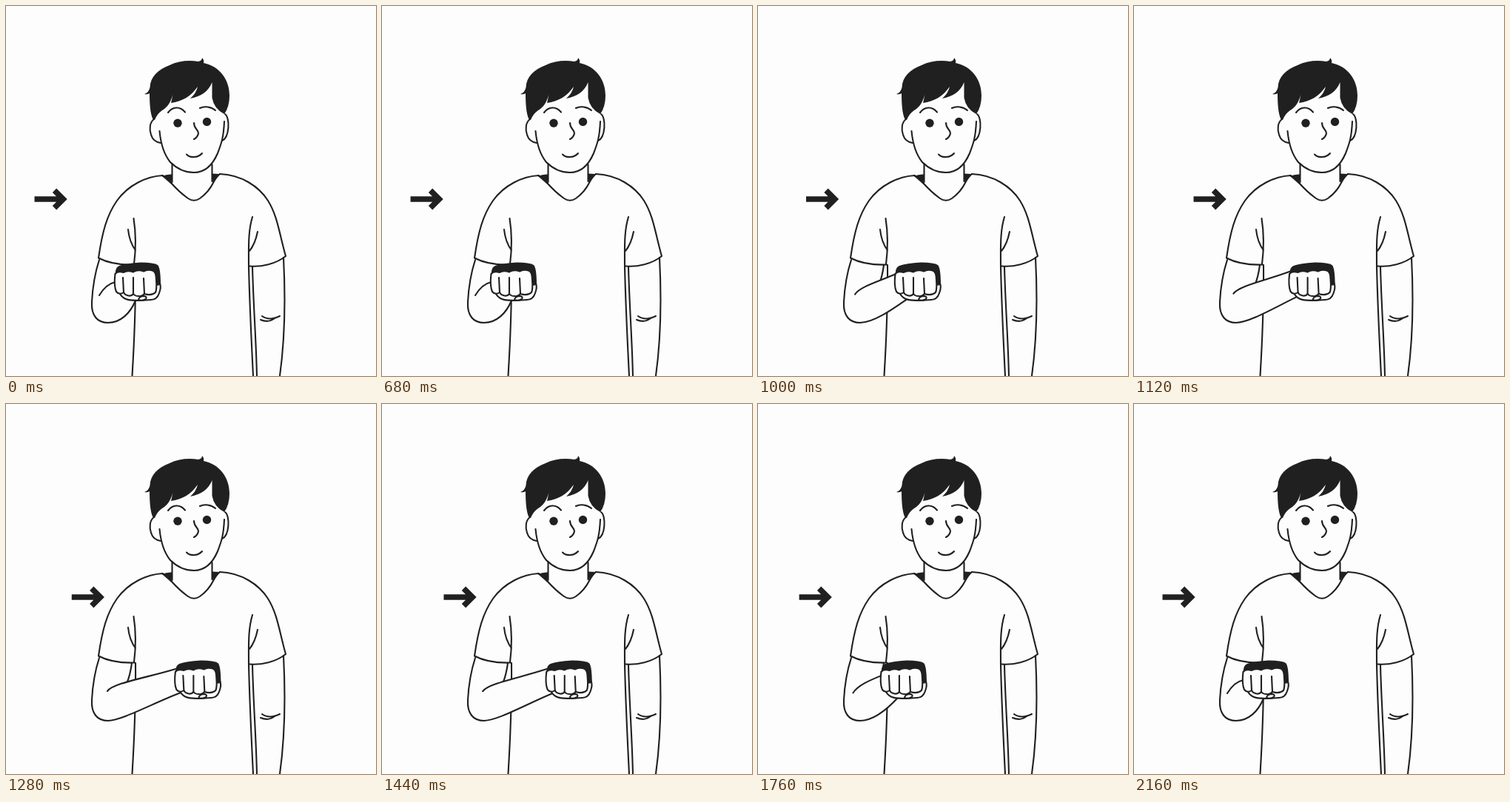
An HTML page for the animation above (3 s loop, 500 by 500 pixels).

```html
<!DOCTYPE html>
<html lang="en">
<head>
<meta charset="utf-8">
<title>Fist moving sideways</title>
<style>
  html, body { margin: 0; width: 100%; height: 100%; overflow: hidden; background: #fdfdfd; }
  svg { display: block; width: 100%; height: 100%; }
  .line { fill: none; stroke: #202020; stroke-width: 2.1; stroke-linecap: round; stroke-linejoin: round; }
  .ink { fill: #202020; }
  .paper { fill: #fdfdfd; }
  .solid { fill: #fdfdfd; }
  .arrow { fill: none; stroke: #202020; stroke-width: 7.6; }
</style>
</head>
<body>
<svg viewBox="0 0 500 500">
  <!-- head -->
  <g class="line">
    <path d="M200 153C194 157 193.500 167 196 174C198 181 203 184 209 185"/>
    <path d="M207.500 169C209 185 213 200 222 211C231 220 242 225 254 225C270 225 280 213 286 199C291 186 294 178 295 156"/>
    <path d="M296 146C303 151 302 178 292 182"/>
    <path d="M219 144C225 136 235 135 242 143.500M262 138C268 135 277 136 283 141"/>
    <path d="M254 158C254 166 260 167 260 172C259 177 256 179 254 180"/>
    <path d="M244 200.500C249 206 260 205 265 199"/>
    <path d="M224.500 213V238M278.500 214V237"/>
  </g>
  <g class="ink">
    <circle cx="232" cy="158.300" r="5.700"/>
    <circle cx="271.500" cy="156.500" r="5.700"/>
    <path d="M187 119Q193 117 194.500 110C195 96 205 86 221 80C233 74 247 73 260 75Q265 74 265 70Q268 73 267 77C288 81 302 99 302 121Q302 136 295 146Q281 139 278.500 124L278.500 103C274 115 264 122 249 125Q257 118 259 109C250 122 238 129 223 131L225.500 120C222 131 218 137 211 141Q204 146 201 154L198.500 153C195 146 194 132 194 118Q191 120 187 119Z"/>
    <path d="M211 230Q217 227 224.500 227.500L223.500 241ZM278.500 226.500L289 227L279.500 240Z"/>
  </g>

  <!-- shirt and resting arm -->
  <g class="line">
    <path d="M211 229Q217 232 223 239C231 248 239 255 246 260Q254 265.500 262 260C269 255 276 247 280 239Q284 231 289 227"/>
    <path d="M212 229C190 230 165 242 150 263C136 283 130 306 125 340.500C140 348.500 158 350 174 349.500"/>
    <path d="M172.500 287C175 303 176 325 173 349M165 302C166 312 169 322 175 330"/>
    <path d="M175 350C175.500 400 173.500 450 170.500 500M170 350Q168 366 163 378"/>
    <path d="M289 227C318 228 342 244 354 263C367 284 369 306 378 338C365 348.500 345 353 329 351.500"/>
    <path d="M333 285C327 305 328 325 328 351C329 400 332 460 334 500M340 305C338 315 334 325 329 331"/>
    <path d="M333 352C334 400 338 450 339 500M375 340C378 400 377 450 370 500"/>
    <path d="M346 419C353 424 362 423 370 419M344 424C351 427 358 426 363 422"/>
  </g>

  <!-- moving arm -->
  <path id="armFill" class="paper"/>
  <path class="line" d="M126 343C120.500 360 117 380 116 400C115 418 123 428 138 428"/>
  <path id="armTop" class="line"/>
  <path id="armBottom" class="line"/>
  <g id="fist">
    <path class="line solid" d="M208 375Q210 380 207 388Q204 397 196 397L181 398C169 398 159 398 154 389L150 370L204 361Z"/>
    <path class="ink" d="M148 362Q147 354 153 351Q162 347.500 182 346.500Q200 346.500 205 350Q209 354 209 377L203 378Z"/>
    <path class="line solid" d="M147.500 362Q151 357.500 159 360Q164 356.500 172 359.500Q178 355.500 186 358.500Q191 355.500 198 357.500Q203 359 203 370Q204 383 202 387Q197 392 187 389Q184 393 179 392Q174 392 172 389Q169 393 164 391Q160 390 159 387Q153 391 149 386Q145.500 378 147.500 362Z"/>
    <path class="line" d="M158 367L159 387M172 367V389M186 368L187 389"/>
    <path class="line solid" d="M179 397Q180 392 187 392Q191 393 189 396Q184 399 179 397Z"/>
  </g>

  <g id="arrow" class="arrow">
    <path d="M38.500 261H77M65.500 249.300L77.300 261L65.500 272.700"/>
  </g>
</svg>
<script>
const LOOP = 3000;
const part = id => document.getElementById(id);
const ease = (t, from, to) => {
  const u = Math.min(1, Math.max(0, (t - from) / (to - from)));
  return (1 - Math.cos(Math.PI * u)) / 2;
};
const swing = (t, start, peak, end) => ease(t, start, peak) - ease(t, peak, end);

function draw(t) {
  const reach = swing(t, 715, 1315, 1970);
  const shift = 82 * reach;
  const arrowShift = 50.3 * swing(t, 715, 1268, 2085);

  const elbow = [126 + 11 * reach, 391 - 3 * reach];
  const bend = [132 + 13 * reach, 381 - 4 * reach];
  const fore = [138 + 52 * reach, 375 - 5 * reach];
  const wrist = [148 + shift, 358 + 15 * (1 - reach) ** 2];
  const heel = [175 + shift - 18 * reach, 398 - 9 * reach];
  const bottom = `C${155 + 3 * reach} ${428 - reach} ${168 + 27 * reach} ${415 - 9 * reach} ${heel}`;

  part("armTop").setAttribute("d", `M${elbow}C${bend} ${fore} ${wrist}`);
  part("armBottom").setAttribute("d", `M138 428${bottom}`);
  part("armFill").setAttribute("d", `M116 400C115 418 123 428 138 428${bottom}`
    + `L${wrist[0] + 12} ${wrist[1]}L${wrist}C${fore} ${bend} ${elbow}Z`);
  part("fist").setAttribute("transform", `translate(${shift})`);
  part("arrow").setAttribute("transform", `translate(${arrowShift})`);
}

const began = performance.now();
function tick() {
  draw((performance.now() - began) % LOOP);
  requestAnimationFrame(tick);
}
tick();
</script>
</body>
</html>
```
